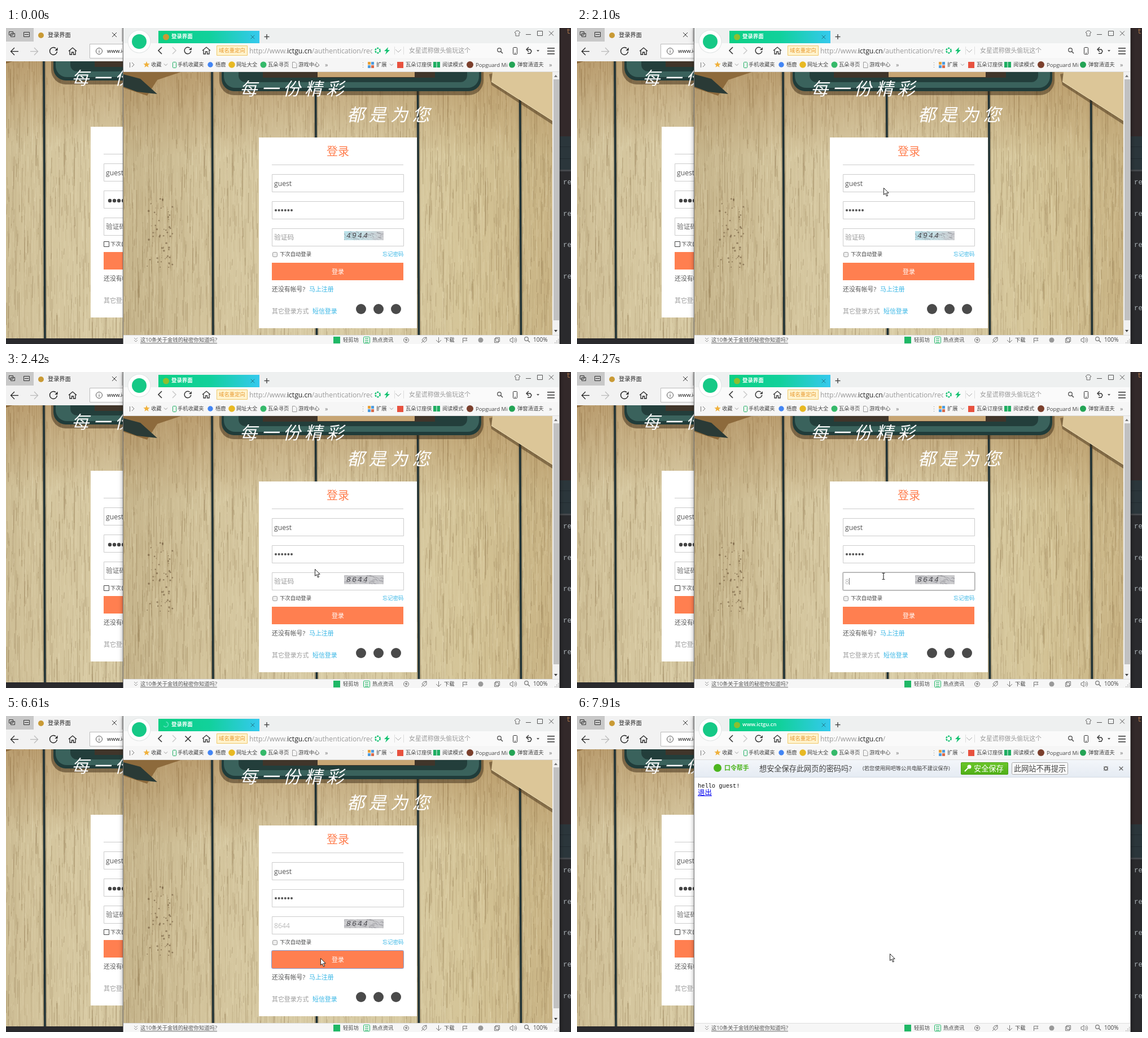
Animation, 1001 px wide and 560 px high, one loop 8 s. Source, as an HTML page with a canvas:

```html
<!DOCTYPE html>
<html lang="zh-CN">
<head>
<meta charset="utf-8">
<title>登录界面</title>
<style>
html, body { margin: 0; width: 100%; height: 100%; overflow: hidden; background: #2a2a2d; }
canvas { display: block; }
</style>
</head>
<body>
<canvas id="stage" width="1001" height="560"></canvas>
<script>
const LOOP = 8000;
const SANS = '"Open Sans", "Noto Sans CJK SC", "Noto Sans CJK", sans-serif';
const MONO = '"Liberation Mono", "Noto Sans CJK SC", "Noto Sans CJK", monospace';
const ORANGE = '#ff7f50', GREEN = '#12c170', BLUE = '#35b5e5', INK = '#444';
const main = document.getElementById('stage').getContext('2d');
let g = main;

// ---- drawing helpers ----
function rect(x, y, w, h, c) { g.fillStyle = c; g.fillRect(x, y, w, h); }
function box(x, y, w, h, c, r = 0) {
  g.strokeStyle = c; g.lineWidth = 1;
  g.beginPath(); g.roundRect(x + .5, y + .5, w - 1, h - 1, r); g.stroke();
}
function round(x, y, w, h, r, c) { g.fillStyle = c; g.beginPath(); g.roundRect(x, y, w, h, r); g.fill(); }
function disc(x, y, r, c) { g.fillStyle = c; g.beginPath(); g.arc(x, y, r, 0, 7); g.fill(); }
function arc(x, y, r, c, w = 1, from = 0, to = 6.3) {
  g.strokeStyle = c; g.lineWidth = w;
  g.beginPath(); g.arc(x, y, r, from, to); g.stroke();
}
function trace(pts) {
  g.beginPath();
  for (let i = 0; i < pts.length; i += 2) g.lineTo(pts[i], pts[i + 1]);
}
function line(c, w, ...pts) { trace(pts); g.strokeStyle = c; g.lineWidth = w; g.stroke(); }
function poly(c, ...pts) { trace(pts); g.fillStyle = c; g.fill(); }
// y is the visual middle of the glyphs; returns the end of the text
function text(s, x, y, size, c, style = '', family = SANS) {
  g.font = `${style} ${size}px ${family}`;
  g.fillStyle = c;
  g.fillText(s, x, y + size * .37);
  return x + g.measureText(s).width;
}
function fade(x0, y0, x1, y1, ...colors) {
  const f = g.createLinearGradient(x0, y0, x1, y1);
  colors.forEach((c, i) => f.addColorStop(i / (colors.length - 1), c));
  return f;
}
function clipped(x, y, w, h, draw) {
  g.save(); g.beginPath(); g.rect(x, y, w, h); g.clip(); draw(); g.restore();
}
function random(seed) {
  return () => (seed = (seed * 16807) % 2147483647) / 2147483647;
}
function cross(x, y, r, c, w = 1) {
  line(c, w, x - r, y - r, x + r, y + r);
  line(c, w, x + r, y - r, x - r, y + r);
}
function chevron(x, y, dx, dy, c, w = 1) {
  if (dx) line(c, w, x - dx, y - dy, x + dx, y, x - dx, y + dy);
  else line(c, w, x - 3, y - dy, x, y + dy, x + 3, y - dy);
}
function lens(x, y, c) {
  arc(x - 1, y - 1, 3.3, c, 1.2);
  line(c, 1.4, x + 1.5, y + 1.5, x + 5, y + 5);
}
function reload(x, y, r, c) {
  arc(x, y, r, c, 1.5, .1, 5.4);
  poly(c, x + r + 1, y - r, x + r + 1, y - 1, x + r - 4, y - 1);
}
function home(x, y, c) {
  line(c, 1.3, x - 7, y, x, y - 6, x + 7, y);
  line(c, 1.3, x - 5, y - 1, x - 5, y + 6, x - 1.5, y + 6, x - 1.5, y + 2, x + 1.5, y + 2, x + 1.5, y + 6, x + 5, y + 6, x + 5, y - 1);
}

// ---- wooden desk, painted once ----
const wood = document.createElement('canvas');
wood.width = 760; wood.height = 492;
function paintWood() {
  g = wood.getContext('2d');
  g.translate(-208, -78);
  const rnd = random(77);
  rect(208, 78, 760, 492, fade(208, 0, 968, 0, '#c6b58c', '#d3c49c', '#d9cca6', '#d9cca5', '#d4c497', '#c8b384'));
  for (let i = 0; i < 5200; i++) {
    const x = 208 + rnd() * 760, y = 40 + rnd() * 530, n = 8 + rnd() * rnd() * 130;
    const c = rnd() < .55 ? '110,82,42' : '244,236,204';
    line(`rgba(${c},${.06 + rnd() * .22})`, .5 + rnd() * .8, x, y, x + rnd() * 2 - 1, y + n);
  }
  for (let i = 0; i < 60; i++) {
    disc(250 + rnd() * 45, 300 + rnd() * 125, .5 + rnd() * 1.3, 'rgba(80,55,30,.45)');
  }
  rect(208, 78, 760, 150, fade(0, 78, 0, 228, 'rgba(150,100,45,.38)', 'rgba(150,100,45,0)'));
  for (const x of [366, 549.5, 730.5, 911.5]) {
    line('rgba(70,55,35,.3)', 7, x - 1, 78, x + 1, 570);
    line('#1d3034', 3.4, x - 1, 78, x, 300, x + 1, 570);
  }
  // pencil, typewriter and sheet of paper along the upper edge
  poly('#8d6a3c', 208, 78, 310, 78, 268, 92, 250, 120, 208, 106);
  poly('#2a3a36', 208, 82, 238, 90, 268, 117, 232, 113, 208, 104);
  round(378, 40, 468, 79, 26, 'rgba(60,42,20,.5)');
  round(382, 40, 460, 72, 22, '#203c3a');
  round(386, 40, 452, 66, 20, '#3a625c');
  round(412, 40, 405, 56, 12, '#233e3b');
  rect(455, 78, 305, 10, '#40352a');
  rect(552, 78, 172, 9, '#c7a574');
  poly('rgba(70,50,25,.5)', 856, 82, 860, 101, 968, 171, 968, 160, 870, 78);
  poly('#dcc698', 862, 78, 968, 78, 968, 164, 860, 95);
  line('#efe0b8', 1, 860, 95, 968, 164);
  g = main;
}

// ---- login page ----
function captcha(code) {
  const rnd = random(+code);
  const first = code === '4944';
  const w = 70, h = 16, left = 599, top = 376 - h;
  clipped(left, top, w, h, () => {
    rect(left, top, w, h, first ? fade(left, 0, left + w, 0, '#b9e2ea', '#c6dfe4', '#cfcfd2') : '#cbcbcd');
    for (let i = 0; i < 120; i++) {
      const x = left - 4 + rnd() * 74, y = top + rnd() * h;
      const v = 90 + rnd() * 150 | 0;
      line(`rgba(${v},${v},${v + 8},.6)`, .8, x, y, x + rnd() * 9, y + rnd() * 6 - 1);
    }
    [...code].forEach((d, i) => text(d, left + 4 + i * 10, top + 7.5, 13, '#4b4b50', 'italic', MONO));
  });
}
function page(dx, dy, o) {
  g.save();
  g.translate(dx, dy);
  g.drawImage(wood, 208, 78);
  [...'每一份精彩'].forEach((c, i) => text(c, 414 + i * 38.3, 108, 31, '#fff', 'italic 300'));
  [...'都是为您'].forEach((c, i) => text(c, 604 + i * 38.5, 154, 31, '#fff', 'italic 300'));
  rect(448, 194, 280, 338, '#fff');
  text('登录', 568, 219, 20, ORANGE);
  rect(471, 242, 233, 1, '#ccc');
  for (const y of [259, 307, 355]) box(471, y, 234, 32, '#ccc');
  text('guest', 475, 275, 12.2, '#555');
  for (let i = 0; i < 6; i++) {
    if (o.edge) disc(482 + i * 8, 325, 3.2, '#444');
    else disc(478 + i * 5.6, 323, 2, '#555');
  }
  if (o.focus) { box(470, 354, 236, 34, '#ccc', 2); box(471, 355, 234, 32, '#aaa'); }
  let end = 475;
  if (o.typed) end = text(o.typed, 475, 371, 12.2, '#bbb');
  else text('验证码', 475, 371, 11.7, o.edge ? '#666' : '#999');
  if (o.caret) rect(Math.round(end), 365, 1, 12, '#777');
  if (o.code) captcha(o.code);
  if (o.edge) box(471, 397, 10, 10, '#444');
  else { round(472, 397, 9, 9, 2, '#eee'); box(472, 397, 9, 9, '#999', 2); }
  text('下次自动登录', o.edge ? 483 : 485, o.edge ? 402 : 401, 9.33, '#444');
  text('忘记密码', 667, 401, 9.33, BLUE);
  rect(471, 416, 233, 31, ORANGE);
  if (o.pressed) box(470, 415, 235, 33, '#7f9fd8', 2);
  text('登录', 577, 432, 10.9, '#fff');
  text('还没有帐号?', 471, 463, 10.9, '#555');
  text('马上注册', 537, 463, 10.9, BLUE);
  text('其它登录方式', 471, 501.5, 10.9, '#999');
  text('短信登录', 543, 501.5, 10.9, BLUE);
  for (const x of [629, 660, 691]) disc(x, 498, 9, '#4a4a4a');
  g.restore();
}

// ---- surroundings of the front window ----
function backWindows(t) {
  rect(0, 0, 1001, 560, '#2a2a2d');
  rect(975, 0, 26, 192, '#33292a');
  rect(975, 192, 26, 60, '#2b363b');
  rect(975, 210, 26, 1, '#222b30');
  rect(975, 231, 26, 1, '#222b30');
  rect(975, 251, 26, 3, '#45484c');
  text('t', 993, 5, 12.5, '#a9744a', '', MONO);
  const rows = t < 1700 ? 4 : 5;
  for (let i = 0; i < rows; i++) text('re', 987, 272 + i * 55.9, 12.5, '#a9b0b5', '', MONO);

  rect(0, 0, 208, 24, '#c8c8c8');
  rect(49, 0, 156, 25, '#f2f2f2');
  rect(0, 24, 208, 35, '#f2f2f2');
  box(5, 6, 8, 7, '#333'); box(8, 9, 8, 7, '#333');
  box(31, 7, 11, 9, '#333'); line('#333', 1, 40, 11.5, 33, 11.5);
  disc(62, 13, 5, '#c99a35');
  text('登录界面', 74, 12, 10.2, '#222');
  cross(192, 12, 4, '#333');
  line('#222', 1.3, 22, 41.5, 9, 41.5); line('#222', 1.3, 15, 35, 8.5, 41.5, 15, 48);
  line('#bbb', 1.3, 43, 41.5, 56, 41.5); line('#bbb', 1.3, 50, 35, 56.5, 41.5, 50, 48);
  reload(84, 41, 6.5, '#222');
  home(118, 41, '#222');
  rect(148, 28, 60, 26, '#fff'); box(148, 28, 70, 26, '#bbb');
  arc(165, 41, 5.5, '#555'); rect(164.5, 40, 1, 4, '#555'); rect(164.5, 38, 1, 1, '#555');
  text('www.ictgu.cn', 179, 40, 9.6, '#111');
  clipped(0, 59, 208, 491, () => page(-298, -19, { edge: true }));
}

function spinner(t) { arc(283, 15, 4.5, '#5fe0c0', 1.5, t / 120, t / 120 + 4); }

function chrome(t, s) {
  g.save();
  g.shadowColor = 'rgba(0,0,0,.5)';
  g.shadowBlur = t < 1310 ? 4 : 8;
  rect(208, 0, 773, 570, '#f5f6f6');
  g.restore();
  rect(208, 0, 773, 27, '#eef0f0');
  rect(208, 27, 773, 26, '#fafafa');
  rect(208, 53, 773, 24, '#f6f6f6');
  rect(208, 77, 773, 1, '#ddd');
  rect(270, 5, 179, 22, fade(270, 0, 449, 0, '#0dcf84', '#11d19b', '#35c9ee'));
  if (s.loading) spinner(t);
  else disc(283.5, 16, 5.5, t < 1900 ? '#c99a35' : '#8cbf2f');
  text(s.title, 293, 15, 9.4, '#fff', '600');
  cross(437, 16, 3.3, '#24788a');
  line('#444', 1.4, 457.5, 15.5, 466.5, 15.5); line('#444', 1.4, 462, 11, 462, 20);
  disc(236, 24, 20.5, '#dfe3e3'); disc(236, 24, 19.5, '#fff'); disc(236, 24, 13, '#15c986');
  // window buttons
  line('#666', 1, 901, 8, 904, 5, 908, 5, 911, 8, 909, 9, 909, 14, 903, 14, 903, 9, 901, 8);
  rect(921, 11, 9, 1, '#555'); box(941, 5, 10, 9, '#555'); cross(966, 9.5, 4, '#555');
  // navigation
  line('#333', 1.6, 276, 34, 270, 40, 276, 46);
  line('#ccc', 1.6, 295, 34, 301, 40, 295, 46);
  if (s.loading) cross(322.5, 40.5, 5, '#333', 1.6); else reload(322, 40, 5.8, '#333');
  home(355, 40, '#333');
  let x = 431;
  if (s.badge) {
    rect(373, 31, 55, 18, '#fff3cd'); box(373, 31, 55, 18, '#f0c86a');
    text('域名重定向', 377, 40, 9.4, '#e8992e');
  } else {
    poly('#2bb673', 381, 36, 386.5, 34, 392, 36, 392, 41, 386.5, 46, 381, 41);
    line('#fff', 1.5, 383.5, 39.5, 389.5, 39.5); line('#fff', 1.5, 386.5, 36.5, 386.5, 42.5);
    x = 397;
  }
  clipped(373, 28, 276, 24, () => {
    x = text('http://www.', x, 40, 12.2, '#999');
    x = text('ictgu.cn', x, 40, 12.2, '#222');
    text(s.path, x, 40, 12.2, '#999');
  });
  g.setLineDash([3, 1.5]); arc(658.5, 40, 4.2, GREEN, 2.4); g.setLineDash([]);
  poly(GREEN, 677, 34, 670, 41, 674, 41, 672, 47, 680, 39, 676, 39);
  rect(688, 33, 1, 14, '#ddd'); rect(704, 33, 1, 14, '#ddd');
  line('#aaa', 1, 690, 38, 695, 43, 700, 38);
  text('女星谎称做头偷玩这个', 714, 40, 10.9, '#999');
  lens(875, 40, '#444');
  box(898, 34, 8, 13, '#333', 1); rect(901, 44, 2, 1, '#333');
  line('#333', 1.4, 926, 34, 922, 38, 926, 42); line('#333', 1.4, 922, 38, 929, 38, 931, 41, 929, 45, 924, 45);
  poly('#555', 940, 39, 945, 39, 942.5, 42);
  for (const y of [35, 40, 45]) rect(959, y, 13, 1.5, '#333');
  bookmarks();
  if (s.bar) passwordBar();
}

function bookmarks() {
  const label = (s, x) => text(s, x, 65, 9.33, INK);
  rect(219, 61, 1, 9, '#777'); chevron(225, 65, 2, 4, '#777');
  const star = [];
  for (let i = 0; i < 10; i++) {
    const r = i % 2 ? 2.6 : 6, a = i * Math.PI / 5;
    star.push(249 + r * Math.sin(a), 65 - r * Math.cos(a));
  }
  poly('#f0b13c', ...star);
  label('收藏', 257); chevron(283, 65, 0, 1.5, '#999');
  box(295, 60, 7, 11, '#1fae62', 1); label('手机收藏夹', 304);
  disc(362, 65, 4.7, '#4285f4'); label('梧鹿', 371);
  disc(400, 65, 5.8, '#e8b923'); label('网址大全', 408);
  disc(456, 65, 5.5, '#35b96a'); label('瓦朵寻页', 464);
  line('#999', 1, 507.5, 60.5, 512, 60.5, 515, 63.5, 515, 70.5, 507.5, 70.5, 507.5, 60.5); label('游戏中心', 518);
  text('»', 565, 65, 11, '#777');
  for (const y of [61, 65, 69]) rect(632, y, 1, 1, '#888');
  rect(641, 60, 5, 5, '#e9a23b'); rect(647, 60, 5, 5, '#4d9de0'); rect(641, 66, 5, 5, '#4d9de0'); rect(647, 66, 5, 5, '#d96c4b');
  label('扩展', 656); chevron(683, 65, 0, 1.5, '#999');
  rect(693, 60, 11, 11, '#e8523f'); label('瓦朵订座侠', 708);
  rect(757, 60, 5.5, 10, '#1fae62'); rect(763.5, 60, 5.5, 10, '#1fae62'); label('阅读模式', 773);
  disc(822, 65, 6, '#7b3f2c'); text('Popguard Mi', 832, 65, 9.5, INK);
  disc(896.5, 65, 5.5, '#23a455'); label('弹窗清道夫', 906);
  text('»', 962, 65, 11, '#777');
}

function passwordBar() {
  rect(208, 78, 773, 30, fade(0, 78, 0, 108, '#f3f6fa', '#e5ebf3'));
  rect(208, 108, 773, 1, '#d5dbe4');
  disc(249, 92, 7, '#4cb51e');
  text('口令帮手', 261, 92, 10.9, '#4cb51e', 'bold');
  text('想安全保存此网页的密码吗?', 323, 93, 13.2, INK);
  text('(若您使用网吧等公共电脑不建议保存)', 506, 93, 9.33, INK);
  round(680, 82, 84, 22, 2, fade(0, 82, 0, 104, '#6cc72b', '#4fae17'));
  box(680, 82, 84, 22, '#47a012', 2);
  disc(695, 90, 3.5, '#fff'); line('#fff', 2, 693, 92, 687, 98);
  text('安全保存', 703, 93, 13.2, '#fff');
  round(770, 82, 100, 22, 2, '#f9f9f9'); box(770, 82, 100, 22, '#aaa', 2);
  text('此网站不再提示', 774, 93, 13.2, INK);
  arc(937, 93, 3, '#777', 2); cross(937, 93, 3.8, '#777'); disc(937, 93, 1.5, '#eef1f6');
  cross(964, 93, 3.3, '#666', 1.3);
}

function statusBar() {
  rect(208, 544, 773, 16, '#f6f6f6'); rect(208, 544, 773, 1, '#ddd');
  const c = '#777', y = 552.5;
  chevron(230, 550.5, 0, 1.5, '#999'); chevron(230, 554.5, 0, 1.5, '#999');
  const end = text('这10条关于金钱的秘密你知道吗?', 238, y, 9.33, '#555');
  rect(238, 558, end - 238, 1, '#777');
  rect(580, 547, 12, 12, '#1fb866'); text('轻剪坊', 597, y, 9.33, INK);
  box(633, 547, 12, 12, '#1fb866', 1);
  for (const row of [550, 553, 556]) rect(636, row, 6, 1, '#1fb866');
  text('热点资讯', 649, y, 9.33, INK);
  arc(709, 553, 4.5, c); poly(c, 711, 549, 706, 553, 709, 553, 707, 557, 712, 552, 709, 552);
  line(c, 1, 736, 558, 745, 548, 740, 549, 737, 553, 741, 557, 745, 554, 745, 548);
  line(c, 1, 766.5, 548, 766.5, 557); line(c, 1, 762, 553, 766.5, 557.5, 771, 553);
  text('下载', 776, y, 9.33, INK);
  line(c, 1, 809.5, 558, 809.5, 549.5, 817, 549.5, 815, 551.5, 817, 554, 810, 554);
  disc(841, 553, 4.5, '#999');
  box(867, 548, 8, 8, c); box(865, 550, 8, 8, c);
  line(c, 1, 893, 551, 895, 551, 898, 548, 898, 558, 895, 555, 893, 555, 893, 551);
  arc(898, 553, 4, c, 1, -1, 1); arc(898, 553, 6.5, c, 1, -.8, .8);
  lens(923, 552, c);
  text('100%', 934, y, 10, INK);
  for (let i = 0; i < 3; i++) {
    for (let j = 0; j <= i; j++) rect(978 - j * 3, 551 + i * 3, 1.5, 1.5, '#aaa');
  }
}

function scrollbar(top) {
  rect(968, top, 13, 544 - top, '#f1f1f1');
  rect(970, top + 13, 10, 427 - (top - 78), '#c1c1c1');
  poly('#777', 971, top + 9, 977, top + 9, 974, top + 5);
  poly('#444', 971, 535, 977, 535, 974, 539);
}

// ---- pointer: time, x, y, visible steps up to the next stop ----
const stops = [
  [200, 660, 376, 5], [560, 400, 110, 3], [770, 264, 33, 1], [850, 317, 40, 1],
  [1460, 317, 40, 8], [2100, 543, 283, 1], [2180, 544, 292, 3], [2420, 547, 349, 3],
  [2660, 543, 362, 1], [5600, 543, 362, 5], [5980, 557, 429, 1], [7910, 554, 421, 1], [LOOP, 554, 421, 1]
];
function pointer(t) {
  if (t < 200) return;
  const i = stops.findIndex(s => s[0] > t) - 1;
  const [t0, x0, y0, n] = stops[i], [t1, x1, y1] = stops[i + 1];
  const u = Math.floor((t - t0) / (t1 - t0) * n) / n;
  const x = x0 + (x1 - x0) * u, y = y0 + (y1 - y0) * u;
  if (t > 2420 && y > 355 && y < 388) {
    line('#333', 1, x - 2.5, y - 5.5, x + 2.5, y - 5.5);
    line('#333', 1.2, x, y - 5.5, x, y + 5.5);
    line('#333', 1, x - 2.5, y + 5.5, x + 2.5, y + 5.5);
    return;
  }
  g.save();
  g.translate(x + .5, y + .5);
  const arrow = [0, 0, 0, 12, 2.8, 9.5, 5, 14.5, 7, 13.6, 4.8, 8.8, 8.7, 8.8, 0, 0];
  poly('#fff', ...arrow); line('#222', 1, ...arrow);
  g.restore();
}

function draw(t) {
  const moved = t >= 7010, done = t >= 7550;
  const typed = '8644'.slice(0, [4270, 4500, 4820, 4980].filter(k => t >= k).length);
  const focus = t >= 3030 && t < 6150;
  backWindows(t);
  chrome(t, {
    loading: (t >= 1460 && t < 1900) || (t >= 6610 && t < 7450),
    title: moved ? 'www.ictgu.cn' : '登录界面',
    path: moved ? '/' : '/authentication/require',
    badge: !moved || done,
    bar: moved
  });
  const top = moved ? 109 : 78;
  if (done) {
    rect(208, top, 773, 544 - top, '#fff');
    text('hello guest!', 214, 123, 10.35, '#111', '', MONO);
    const end = text('退出', 214, 135.5, 12.4, '#00e');
    rect(214, 141, end - 214, 1, '#00e');
  } else {
    clipped(208, top, 760, 544 - top, () => page(0, top - 78, {
      code: t < 2280 ? '4944' : '8644',
      typed, focus,
      caret: focus && (t < 3580 || t >= 4270),
      pressed: t >= 6150
    }));
    scrollbar(top);
  }
  statusBar();
  rect(207, 0, 1, 560, '#777'); rect(980, 0, 1, 560, '#999');
  pointer(t);
}

paintWood();
const start = performance.now();
function tick() {
  draw((performance.now() - start) % LOOP);
  requestAnimationFrame(tick);
}
tick();
</script>
</body>
</html>
```
